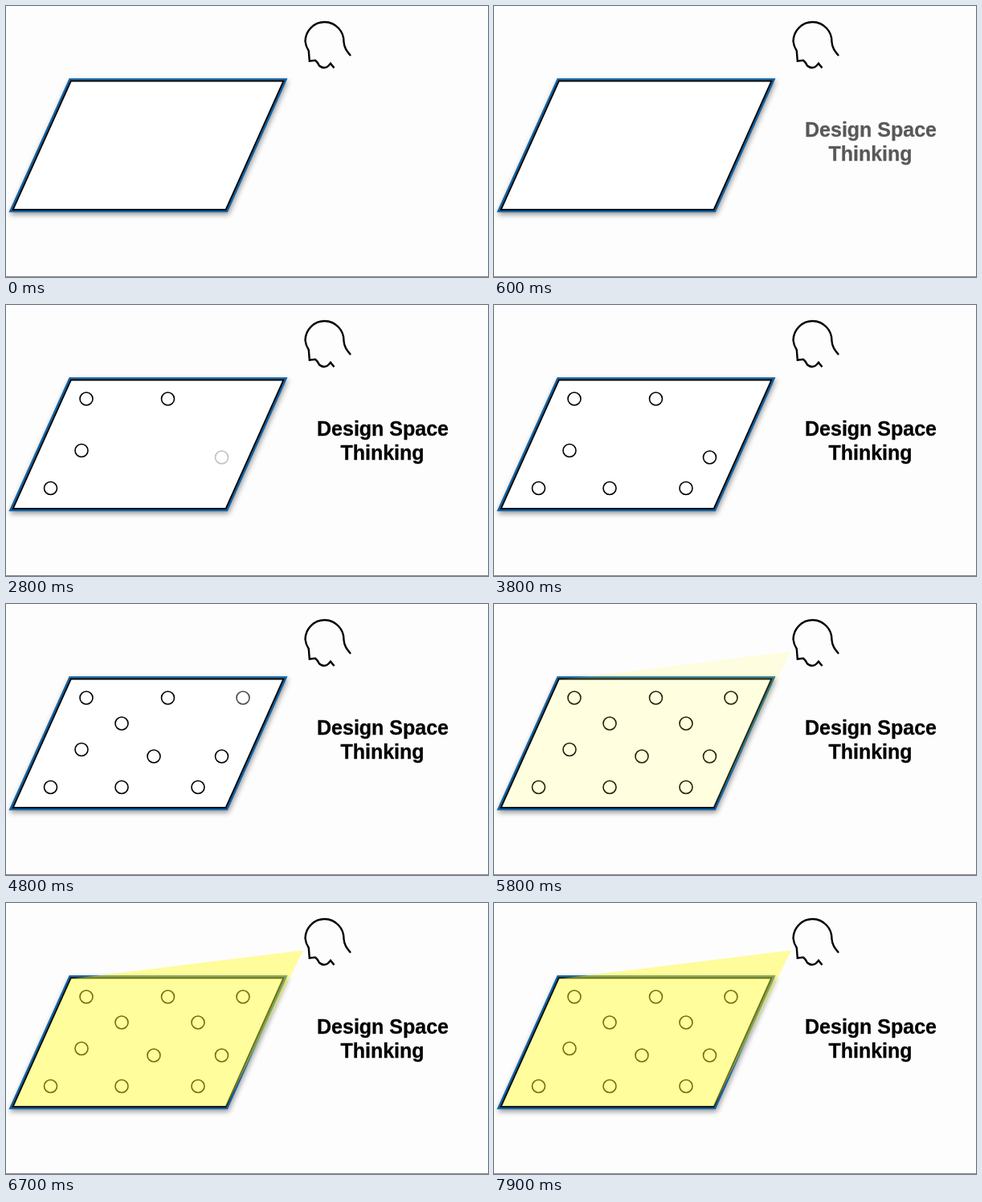
An HTML page for the animation above (8000 ms loop, 600 by 338 pixels).

```html
<!DOCTYPE html>
<html lang="en">
<head>
<meta charset="utf-8">
<title>Design Space Thinking</title>
<style>
  html, body { margin: 0; width: 100%; height: 100%; overflow: hidden; background: #fefdfe; }
  svg { display: block; width: 600px; height: 338px; }
  .plane { filter: drop-shadow(1px 3px 3px rgba(0, 0, 0, .4)); }
  .line { fill: none; stroke: #000; }
  text { font: bold 25px "Liberation Sans", Arial, sans-serif; text-anchor: middle; stroke: #000; stroke-width: .3px; }
</style>
</head>
<body>
<svg viewBox="0 0 600 338">
  <path class="plane" d="M79.5 91.500H348.500L275 256H5.500Z" fill="#fff" stroke="#0d62a6" stroke-width="2.6"/>
  <path class="line" d="M80.800 93.500H345.500L273.700 254H8.600Z" stroke-width="1.9"/>
  <path class="line" stroke-width="2.4" d="M429 62C424 56 421 52 420.500 45A24 24.500 0 0 0 372.500 44Q373 50 376.800 56L377.800 68.700L385 67.700Q388 70 390 74.500C394 78 399 77.500 401.500 74.500L404 71.700L408.500 77.300"/>
  <g id="dots" class="line" stroke-width="1.6"></g>
  <path id="beam" d="M370 59L81 94.500L10 253.500H274Z" fill="#fffa1e"/>
  <g id="title">
    <text x="469" y="163">Design Space</text>
    <text x="468.500" y="193">Thinking</text>
  </g>
  <path d="M0 337.500H600" stroke="#888"/>
</svg>
<script>
const LOOP = 8000, FIRST_DOT = 1220, DOT_STEP = 386, DOT_FADE = 150;
const byId = id => document.getElementById(id);
const ramp = (t, start, length) => Math.min(1, Math.max(0, (t - start) / length));

// Dot centres in order of appearance
const dots = [
  [201.5, 117], [100, 117], [94, 181.5], [55.5, 228.5], [268.5, 190], [239, 228.5],
  [144, 228.5], [184, 190], [144, 149], [295, 117], [239, 149]
].map(([cx, cy]) => {
  const dot = document.createElementNS("http://www.w3.org/2000/svg", "circle");
  for (const [name, value] of Object.entries({ cx, cy, r: 8 })) dot.setAttribute(name, value);
  byId("dots").append(dot);
  return dot;
});

function draw(now) {
  const t = now % LOOP;
  byId("title").style.opacity = ramp(t, 50, 850);
  dots.forEach((dot, i) => {
    dot.style.opacity = ramp(t, FIRST_DOT + i * DOT_STEP, DOT_FADE);
  });
  byId("beam").style.opacity = 0.44 * ramp(t, 5550, 800);
  requestAnimationFrame(draw);
}
draw(0);
</script>
</body>
</html>
```
